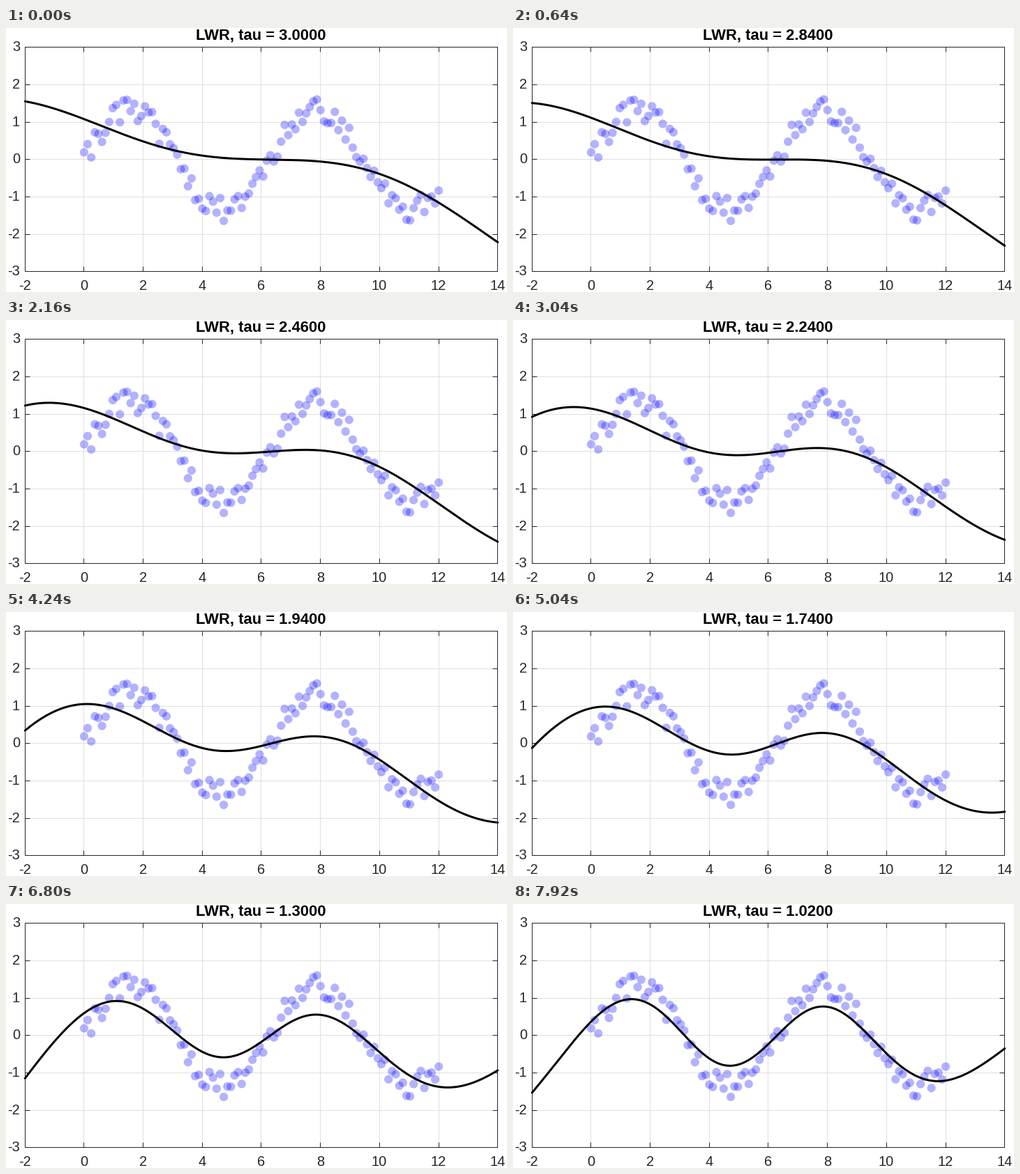
A matplotlib script that plays this animation: 718x379 px, repeating every 8 s.

```python
import numpy as np
import matplotlib.pyplot as plt
from matplotlib.animation import FuncAnimation
from matplotlib.transforms import Affine2D

W, H, DPI = 718, 379, 64
PX = 72 / DPI                      # points per pixel
LEFT, RIGHT, TOP, BOTTOM = 26.7, 704.3, 27.4, 349.4
FRAMES, INTERVAL = 100, 80
INK = "#262626"

plt.rcParams["font.family"] = "Liberation Sans"

# Standardised samples of a sine with uniform noise
xs = np.linspace(0, 12, 100)
ys = np.sin(xs) + 0.5 * np.random.RandomState(5489).rand(xs.size)
ys = (ys - ys.mean()) / ys.std(ddof=1)
query = np.linspace(-2, 14, 400)


def local_fit(tau):
    """Locally weighted linear regression with a Gaussian kernel."""
    d = xs - query[:, None]
    w = np.exp(-d**2 / (2 * tau**2))
    s0, s1, s2 = w.sum(1), (w * d).sum(1), (w * d**2).sum(1)
    t0, t1 = (w * ys).sum(1), (w * d * ys).sum(1)
    return (s2 * t0 - s1 * t1) / (s0 * s2 - s1**2)


fig = plt.figure(figsize=(W / DPI, H / DPI), dpi=DPI, facecolor="white")
ax = fig.add_axes([LEFT / W, 1 - BOTTOM / H,
                   (RIGHT - LEFT) / W, (BOTTOM - TOP) / H])
ax.set(xlim=(-2, 14), ylim=(-3, 3),
       xticks=range(-2, 15, 2), yticks=range(-3, 4))
ax.set_axisbelow(True)
ax.grid(color="#dfdfdf", lw=PX)
ax.tick_params(direction="in", length=7 * PX, width=PX, color=INK,
               top=True, right=True, labelbottom=False, labelleft=False)
for spine in ax.spines.values():
    spine.set(color=INK, linewidth=PX)

# Axis lines snap to pixel centres; shift the data by the same half pixel
shifted = ax.transData + Affine2D().translate(0.5, 0.5)


def label(x, baseline, text, size, **kw):
    return fig.text(x / W, 1 - baseline / H, text, fontsize=size * PX,
                    va="baseline", **kw)


for v in range(-2, 15, 2):
    x = LEFT + (v + 2) / 16 * (RIGHT - LEFT)
    label(x, 376, str(v), 20, color=INK, ha="center")
for v in range(-3, 4):
    y = TOP + (3 - v) / 6 * (BOTTOM - TOP)
    label(20, y + 6, str(v), 20, color=INK, ha="right")

ax.scatter(xs, ys, s=np.full(xs.size, (12.2 * PX)**2), color="blue",
           alpha=0.3, linewidths=0, zorder=3, transform=shifted)
curve, = ax.plot([], [], color="black", lw=3 * PX, zorder=4, clip_on=False,
                 solid_capstyle="round", solid_joinstyle="round",
                 transform=shifted)
title = label(365.5, 17, "", 22, color="black", ha="center", weight="bold")


def update(frame):
    tau = 3 - 0.02 * frame
    curve.set_data(query, local_fit(tau))
    title.set_text(f"LWR, tau = {tau:.4f}")
    return curve, title


anim = FuncAnimation(fig, update, frames=FRAMES, interval=INTERVAL,
                     repeat=True, repeat_delay=0)
plt.show()
```
